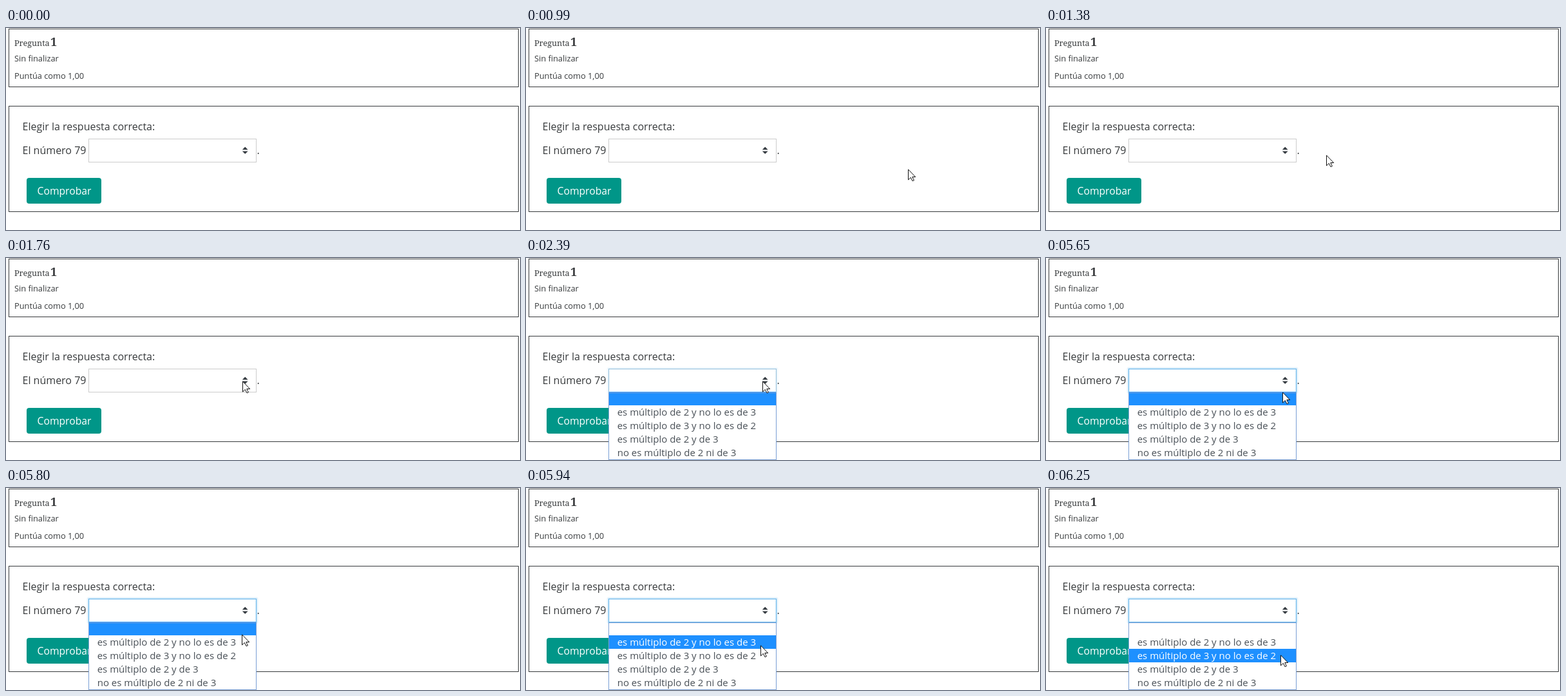
Animation of 798 by 314 pixels, one loop 8000 ms. Source, as an HTML page:

```html
<!DOCTYPE html>
<html lang="es">
<head>
<meta charset="utf-8">
<style>
  html, body { margin: 0; width: 100%; height: 100%; overflow: hidden; background: #fff; }
  svg { display: block; }
  text { font: 16px "Open Sans", sans-serif; fill: #373a3c; white-space: pre; }
  .small { font-size: 12.8px; }
  .serif { font: 12.6px "Noto Serif", serif; }
  .number { font: bold 18px "Noto Serif", serif; }
  .button { font-size: 15.7px; fill: #fff; text-anchor: middle; }
  .option { font-size: 15px; fill: #495057; }
  .option.active { fill: #fff; }
  .box { fill: none; stroke: #373a3c; }
</style>
</head>
<body>
<svg width="798" height="314" viewBox="0 0 798 314">
  <rect class="box" x="4.5" y="1.5" width="791" height="90"/>
  <text class="serif" x="13" y="28">Pregunta</text>
  <text class="number" x="69" y="28">1</text>
  <text class="small" x="13" y="52">Sin finalizar</text>
  <text class="small" x="13" y="79">Puntúa como 1,00</text>

  <rect class="box" x="4.5" y="121.5" width="791" height="164"/>
  <text x="25.5" y="159">Elegir la respuesta correcta:</text>
  <text x="25.5" y="196">El número 79</text>
  <text x="389.5" y="196">.</text>
  <rect x="32" y="233" width="116" height="40" rx="4" fill="#009688"/>
  <text class="button" x="90.5" y="258.5">Comprobar</text>

  <rect x="128.5" y="172.5" width="260" height="36" fill="#fff" stroke="#ccc"/>
  <g id="focus" fill="none" stroke="#66b5ea">
    <rect x="127.5" y="171.5" width="262" height="38" rx="1" stroke-opacity=".12" stroke-width="4"/>
    <rect x="128" y="172" width="261" height="37" rx="1" stroke-opacity=".15" stroke-width="3"/>
    <rect x="128.5" y="172.5" width="260" height="36"/>
  </g>
  <path transform="translate(366.8 184.8) scale(2.2)" d="M2 0L0 2h4zm0 5L0 3h4z" fill="#343a40"/>

  <g id="menu">
    <rect x="128.5" y="209.5" width="260" height="104" fill="#fff"/>
    <rect id="highlight" x="129" width="259" height="21" fill="#1e90ff"/>
    <rect x="128.5" y="209.5" width="260" height="104" fill="none" stroke="#7a9fd4"/>
  </g>

  <path id="cursor" d="M.5 .9V17L4.3 13.4L7 18.8L9.4 17.8L6.8 12.5H11.7Z" fill="#fff" stroke="#111" stroke-linejoin="round"/>
</svg>
<script>
const LOOP = 8000, ROW = 21, MENU_TOP = 208;
const FOCUS_START = 2310, FOCUS_TIME = 160, MENU_OPEN = 2390;
const byId = id => document.getElementById(id);
const cursor = byId("cursor"), menu = byId("menu"), focus = byId("focus"), highlight = byId("highlight");

const moves = [
  { start: 600, step: 78, points: [[694, 274], [676, 262], [657, 250], [637, 239], [616, 229], [593, 219],
    [567, 211], [538, 205], [505, 201], [470, 198], [435, 197]] },
  { start: 1460, step: 75, points: [[403, 192], [386, 188], [375, 188], [369, 190], [367, 191]] },
  { start: 5650, step: 75, points: [[367, 208], [367, 217], [366, 227], [365, 237], [364, 244],
    [364, 249], [364, 253], [364, 257], [364, 259]] }
];

const options = ["", "es múltiplo de 2 y no lo es de 3", "es múltiplo de 3 y no lo es de 2",
  "es múltiplo de 2 y de 3", "no es múltiplo de 2 ni de 3"].map((label, i) => {
  const text = document.createElementNS("http://www.w3.org/2000/svg", "text");
  text.setAttribute("x", 141.7);
  text.setAttribute("y", 224 + ROW * i);
  text.textContent = label;
  menu.append(text);
  return text;
});

function pointerAt(t) {
  const move = moves.findLast(m => t >= m.start);
  if (!move) return null;
  // Slack absorbs the uneven lengths of the steps.
  const index = Math.floor((t - move.start + 12) / move.step);
  return move.points[Math.min(index, move.points.length - 1)];
}

function draw(t) {
  const pointer = pointerAt(t);
  cursor.style.display = pointer ? "" : "none";
  if (pointer) cursor.setAttribute("transform", `translate(${pointer})`);

  focus.style.opacity = Math.max(0, Math.min(1, (t - FOCUS_START) / FOCUS_TIME));
  menu.style.display = t >= MENU_OPEN ? "" : "none";

  const active = pointer ? Math.max(0, Math.floor((pointer[1] - MENU_TOP) / ROW)) : 0;
  highlight.setAttribute("y", MENU_TOP + ROW * active);
  highlight.setAttribute("height", ROW);
  options.forEach((text, i) => text.setAttribute("class", i === active ? "option active" : "option"));
}

const begin = performance.now();
function tick() {
  draw((performance.now() - begin) % LOOP);
  requestAnimationFrame(tick);
}
tick();
</script>
</body>
</html>
```
